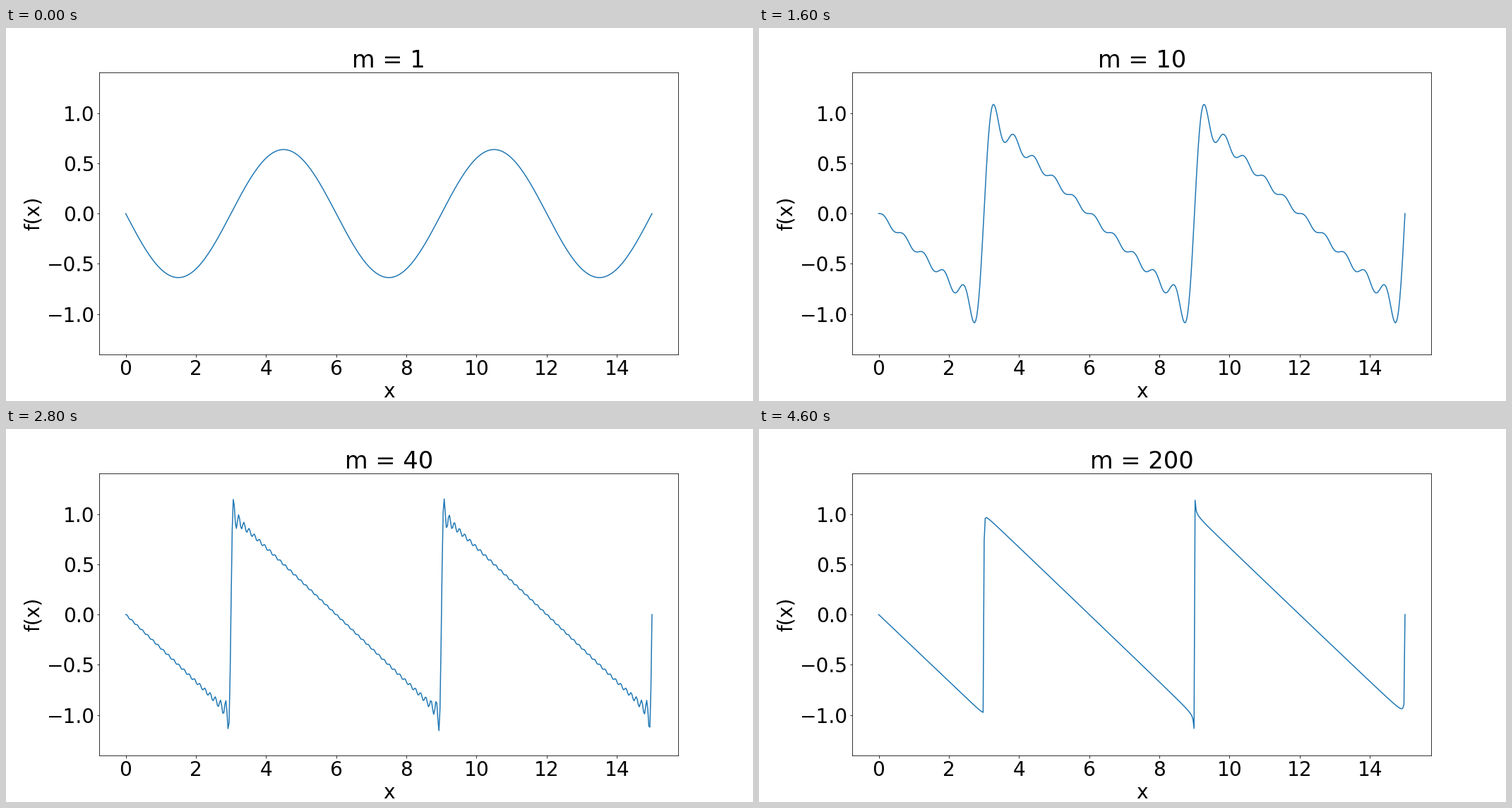
Write a matplotlib script that moves like this. It is 1058 px wide and 529 px high and loops after 4.8 s.

```python
import numpy as np
import matplotlib.pyplot as plt
from matplotlib.animation import FuncAnimation

WIDTH, HEIGHT, DPI = 1058, 529, 72
STEP_MS = 200
# Number of Fourier terms summed at each step
TERMS = [1, 2, 3, 5, 6, 7, 8, 9, 10, 14, 15, 20,
         25, 30, 40, 45, 50, 60, 70, 80, 90, 100, 150, 200]
HALF_PERIOD = 3

plt.rcParams.update({
    "font.family": "DejaVu Sans",
    "font.size": 28,
    "toolbar": "None",
})


def sawtooth(x, m):
    """Partial Fourier sum of a falling sawtooth with m terms."""
    k = np.arange(1, m + 1)[:, None]
    waves = (-1.0) ** k * 2 / (k * np.pi) * np.sin(k * np.pi * x / HALF_PERIOD)
    return waves.sum(axis=0)


x = np.linspace(0, 15, 500)

# The small surplus keeps the pixel size from being truncated
fig = plt.figure(figsize=((WIDTH + 0.001) / DPI, (HEIGHT + 0.001) / DPI), dpi=DPI,
                 facecolor="white")
fig.subplots_adjust(left=0.125, right=0.9, bottom=0.125, top=0.88)
ax = fig.add_subplot()
line, = ax.plot(x, sawtooth(x, TERMS[0]), color="#1f77b4", lw=1.5)
ax.set_xlim(-0.75, 15.75)
ax.set_ylim(-1.4, 1.4)
ax.set_xticks(range(0, 15, 2))
ax.set_yticks([-1, -0.5, 0, 0.5, 1])
ax.set_xlabel("x")
ax.set_ylabel("f(x)")
title = ax.set_title(f"m = {TERMS[0]}")


def update(i):
    m = TERMS[i]
    line.set_ydata(sawtooth(x, m))
    title.set_text(f"m = {m}")
    return line, title


anim = FuncAnimation(fig, update, frames=len(TERMS), interval=STEP_MS,
                     repeat=True, repeat_delay=0, blit=False)
plt.show()
```
